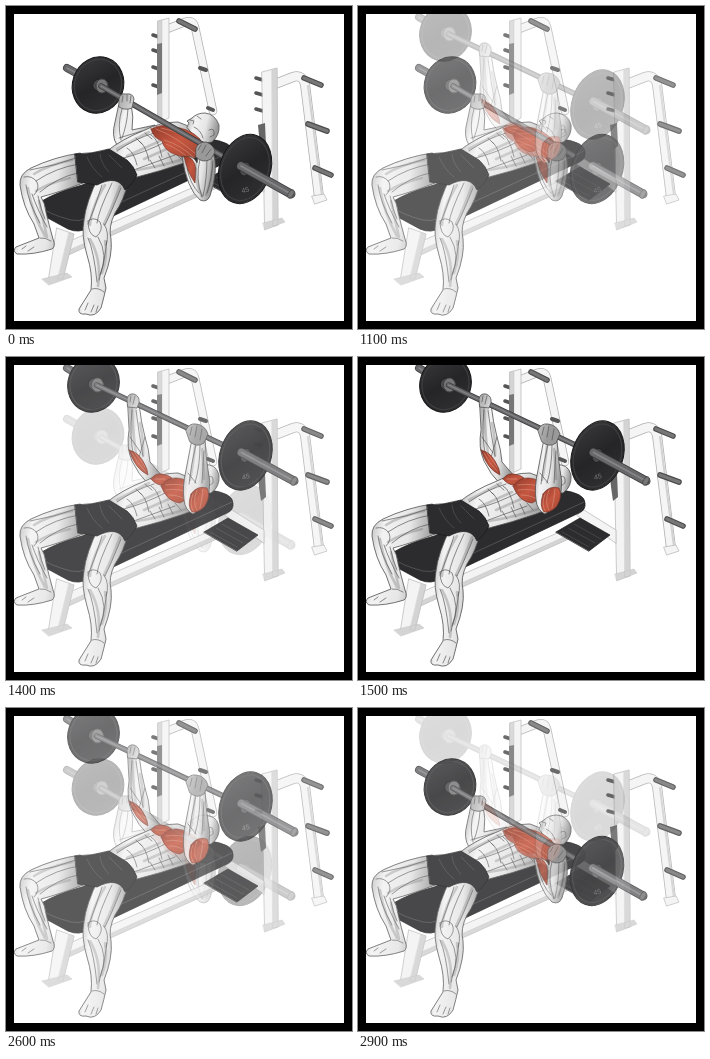
These frames come from a looping animation (346 px wide and 323 px high, 3000 ms). An HTML page:

```html
<!DOCTYPE html>
<html lang="en">
<meta charset="utf-8">
<title>Bench press</title>
<style>
html, body { margin: 0; width: 100%; height: 100%; overflow: hidden; background: #000 }
svg { display: block; width: 100%; height: 100% }
path, ellipse { stroke-linecap: round; stroke-linejoin: round }
.skin { fill: url(#skin); stroke: #505050; stroke-width: .8 }
.line { fill: none; stroke: #505050; stroke-width: .65 }
.shade { fill: none; stroke: #666; stroke-opacity: .32; stroke-width: 2.6 }
.red { fill: url(#red); stroke: #6f2f24; stroke-width: .6 }
.fiber { fill: none; stroke: #dc9480; stroke-width: .6 }
.steel { fill: #f4f4f4; stroke: #b4b4b4; stroke-width: .7 }
.edge { fill: #d4d4d4; stroke: #bbb; stroke-width: .4 }
.tube { fill: none }
.dark { fill: #2c2c2e; stroke: #19191a; stroke-width: .7 }
</style>
<svg viewBox="0 0 346 323" preserveAspectRatio="none">
<defs>
  <clipPath id="frame"><path d="M8 8H338V315H8Z"/></clipPath>
  <linearGradient id="skin" x2="1" y2=".25">
    <stop stop-color="#a6a6a6"/><stop offset=".3" stop-color="#f3f3f3"/>
    <stop offset=".65" stop-color="#e6e6e6"/><stop offset="1" stop-color="#999"/>
  </linearGradient>
  <linearGradient id="red" x2="1" y2="1">
    <stop stop-color="#8f3a2b"/><stop offset=".5" stop-color="#c65740"/><stop offset="1" stop-color="#a04634"/>
  </linearGradient>
  <linearGradient id="plate" x2="1" y2="1">
    <stop stop-color="#3c3c3e"/><stop offset=".5" stop-color="#252527"/><stop offset="1" stop-color="#333335"/>
  </linearGradient>

  <g id="rack">
    <g class="tube">
      <path id="leftLeg" d="M161 23L179 16Q187 13 189 21L207 105" stroke="#b0b0b0" stroke-width="8.5"/>
      <path d="M161 23L179 16Q187 13 189 21L207 105" stroke="#f5f5f5" stroke-width="7"/>
      <path d="M269 78L287 71Q296 68 299 78L313 191" stroke="#b0b0b0" stroke-width="10"/>
      <path d="M269 78L287 71Q296 68 299 78L313 191" stroke="#f5f5f5" stroke-width="8.4"/>
      <path d="M302 80L316 190" stroke="#d2d2d2" stroke-width="2"/>
      <path d="M147 29L153 31M147 44L153 46M147 61L153 63M147 79L153 81M250 72L257 74M250 87L257 89M250 103L257 105" stroke="#555" stroke-width="3.6"/>
      <path d="M194 62L200 64M202 102L207 104" stroke="#555" stroke-width="4"/>
      <path d="M173 15L189 23M298 72L315 79M302 118L321 125M309 162L325 169" stroke="#4b4b4d" stroke-width="5.6"/>
      <path d="M173 15L189 23M298 72L315 79M302 118L321 125M309 162L325 169" stroke="#777" stroke-width="3.4"/>
    </g>
    <path class="steel" d="M152 15L163 12V112L152 117ZM306 190L318 188L321 194L309 198Z"/>
    <path class="edge" d="M152 15L156 14V116L152 117Z"/>
    <path d="M151 38L156 37V87L151 89Z" fill="#777"/>
    <path class="steel" d="M256 66L271 62L272 219L259 223Z"/>
    <path class="edge" d="M266 64L271 62L272 219L267 220ZM257 217L276 212L279 216L259 224Z"/>
    <path d="M252 119L259 117L260 140L255 144L253 130Z" fill="#666"/>
  </g>

  <g id="bench">
    <path class="steel" d="M219 158L226 153L258 173V186ZM57 238L220 167L226 175L60 250Z"/>
    <path class="edge" d="M59 246L224 172L226 175L60 250Z"/>
    <path class="steel" d="M51 222L68 228L57 273L43 272Z"/>
    <path class="edge" d="M63 227L68 228L57 273L52 273ZM36 273L61 267L66 271L43 279Z"/>
    <path class="dark" d="M198 175L222 161L252 178L231 194Z"/>
    <path d="M204 175L231 190M210 171L237 186M216 167L243 182" stroke="#505050" stroke-width=".7"/>
    <path class="dark" d="M34 196Q50 186 76 179L203 133Q227 136 227 146Q228 153 221 156L84 221Q73 228 62 223L38 210Q30 204 34 196Z"/>
    <path d="M35 201Q42 208 65 214Q73 216 81 212L226 145" fill="none" stroke="#505052" stroke-width="1"/>
  </g>

  <g id="body">
    <path class="skin" d="M74 147Q48 151 25 162Q13 168 14 179Q17 201 28 218L33 232L10 241Q6 245 11 248Q27 249 46 243Q50 240 47 233Q43 219 40 206Q39 197 35 191Q54 186 77 177Z"/>
    <path class="shade" d="M66 154Q42 159 28 168M64 172Q43 177 30 185M22 182Q26 207 39 230M33 195Q37 214 41 231"/>
    <path class="line" d="M73 151Q49 160 24 164M73 158Q49 162 30 175M72 167Q52 171 34 186M18 171Q26 169 31 176Q34 183 28 189M20 179Q22 196 34 217M26 188Q31 203 41 221M32 190Q35 204 39 213M34 232Q39 231 45 235M16 243L20 240M22 245L28 241"/>

    <path class="skin" d="M101 145Q116 133 139 124Q154 116 172 116Q190 121 197 138Q196 151 178 157Q155 165 131 171Z"/>
    <path class="shade" d="M111 143L143 126M131 164Q158 160 183 151M121 150L154 135M138 153L163 142"/>
    <path class="line" d="M114 153Q139 147 163 134M111 145Q128 133 148 127M125 165Q147 157 169 149M121 142Q128 146 131 159M133 135Q140 139 143 155M145 129Q152 132 156 151M119 158L128 166M149 162L144 154M158 160L153 150M167 157L162 147M175 153L169 146M139 127L146 133M130 132L136 138"/>

    <path class="skin" d="M93 170Q80 196 78 214Q75 229 81 249Q87 268 85 284L73 303Q72 309 80 308Q89 312 95 302Q98 291 100 282L98 272Q107 249 105 233Q102 221 109 207Q118 194 122 176L112 167Z"/>
    <path class="shade" d="M99 179Q85 202 84 219M114 180Q105 204 98 218M84 233Q96 254 92 280M99 235Q102 251 96 267"/>
    <path class="line" d="M96 179Q88 204 82 218M106 177Q92 206 91 217M115 182Q105 207 99 219M82 215Q88 210 94 216Q98 224 90 231Q82 229 82 215M98 218Q104 227 100 239M82 232Q88 245 91 276M92 231Q103 249 94 269M101 235Q99 255 93 274M86 283Q92 281 98 286M79 304L82 297M85 306L88 299M90 306L92 300"/>

    <path class="dark" d="M69 148Q86 148 103 143L121 154Q128 160 131 169Q127 178 119 184Q112 168 91 179L72 176Z"/>
    <path d="M94 148Q95 158 103 166M103 149L116 162M81 151Q86 163 96 171" fill="none" stroke="#48484a" stroke-width="1"/>
  </g>
</defs>

<g clip-path="url(#frame)">
  <path d="M0 0H346V323H0Z" fill="#fff"/>
  <g id="lowered">
    <use href="#rack"/><use href="#bench"/>
    <path class="skin" d="M113 99L125 97Q128 111 126 124L149 119L151 126Q132 129 111 139Q105 130 109 116Z"/>
    <path class="line" d="M116 103Q111 119 115 134M122 103Q121 119 116 132M113 132L136 125"/>
    <use href="#body"/>
    <path class="skin" d="M181 121L183 117L181 115L186 112Q191 107 199 107Q209 108 213 119Q214 129 206 136Q195 139 189 131Z"/>
    <path class="line" d="M184 114L188 115L187 118M191 110L195 113M203 124Q209 121 208 129L204 131M188 121Q195 124 197 132"/>
    <path class="red" d="M145 123Q155 117 165 121Q182 121 194 133Q198 142 190 151Q179 153 168 148Q158 144 156 135Q147 132 145 123Z"/>
    <path class="fiber" d="M150 123Q168 129 191 149M155 122Q177 126 194 140M158 134Q175 139 187 151M160 138Q174 144 181 151"/>
    <path class="skin" d="M176 151Q187 148 191 157L193 146L207 146Q213 163 204 190Q201 197 194 194Q181 183 176 151Z"/>
    <path class="red" d="M178 150Q188 150 190 163L189 177Q181 166 178 150Z"/>
    <path class="shade" d="M190 158Q189 178 196 190M206 154Q207 173 200 189"/>
    <path class="line" d="M194 153Q189 172 196 191M201 151Q201 174 197 190M207 155Q206 172 201 187M181 162Q184 178 193 187"/>
    <g id="lowBar"></g>
    <path class="skin" d="M113 93Q114 87 120 88Q127 87 128 93L126 102Q119 105 113 101ZM190 142Q192 136 200 136Q208 139 209 146L205 153Q197 158 190 151Z"/>
    <path class="line" d="M117 90L116 96M121 89V95M125 90L124 97M195 139L192 144M200 139L196 147M205 143L200 150"/>
  </g>

  <g id="raised">
    <use href="#rack"/><use href="#bench"/>
    <path class="skin" d="M198 108Q210 106 213 118Q214 130 205 136Q196 137 192 128Z"/>
    <path class="line" d="M202 120Q208 117 207 126L203 129"/>
    <path class="skin" d="M122 47L133 47Q135 65 139 80Q143 92 144 105L157 120L143 128Q132 117 126 104Q120 91 123 73Z"/>
    <path class="shade" d="M126 52Q127 76 130 97M134 66Q138 86 137 99"/>
    <path class="line" d="M126 53Q123 79 128 101M130 53Q133 77 137 99M124 80L135 96M139 80L132 104"/>
    <path class="red" d="M123 93Q132 95 137 104Q142 112 142 118Q129 112 123 93Z"/>
    <path class="fiber" d="M126 96Q131 106 139 114M129 96Q134 102 139 110"/>
    <use href="#body"/>
    <path class="red" d="M145 122Q149 116 156 117Q163 118 166 121L156 128Q150 128 145 122Z"/>
    <path class="red" d="M155 129Q162 120 171 121Q182 122 187 129Q186 141 174 146Q161 145 155 129Z"/>
    <path class="fiber" d="M160 128Q173 126 184 130M160 133Q174 131 183 136M163 138Q172 138 179 142M149 122L159 122"/>
    <g id="highBar"></g>
    <path class="skin" d="M186 84L199 83Q200 100 202 113Q205 124 203 135Q200 149 187 157Q179 153 178 143Q176 130 180 113Z"/>
    <path class="red" d="M185 137Q191 128 201 131Q205 139 199 149Q193 156 186 155Q181 149 185 137Z"/>
    <path class="fiber" d="M187 137Q183 147 187 154M191 133Q186 145 191 153M197 132Q196 143 194 151"/>
    <path class="shade" d="M189 89Q187 110 184 123M196 92Q198 112 198 122"/>
    <path class="line" d="M190 87Q185 108 183 127M194 88Q194 109 189 126M198 94L196 126M182 116L190 126"/>
    <path class="skin" d="M121 42Q122 36 128 37Q134 39 133 46L131 51L122 50ZM180 73Q183 66 190 67Q199 68 202 77L198 86Q191 91 184 85Z"/>
    <path class="line" d="M125 39L124 45M129 39L127 47M186 70L184 78M191 69L189 80M196 72L194 83"/>
  </g>
</g>
</svg>
<script>
const byId = id => document.getElementById(id);
const stroke = (from, to, width, color) =>
  `<path d="M${from}L${to}" stroke="${color}" stroke-width="${width}" stroke-linecap="butt"/>`;
const rod = (from, to, width) =>
  stroke(from, to, width, '#3a3a3a') + stroke(from, to, width - 1.4, '#68686b') + stroke(from, to, width * .2, '#858587');

function disc([x, y], rx, ry) {
  const ring = (scale, fill, color) =>
    `<ellipse rx="${rx * scale}" ry="${ry * scale}" fill="${fill}" stroke="${color}"/>`;
  return `<g transform="translate(${x} ${y}) rotate(19)">${ring(1, 'url(#plate)', '#171718')}
    ${ring(.91, 'none', '#404042')}${ring(.2, '#4a4a4c', '#222')}</g>`;
}

function barbell(start, far, near, end) {
  const [x, y] = near;
  return rod(start, far, 8) + disc(far, 25.5, 28.5)
    + `<ellipse cx="${far[0] + 4}" cy="${far[1] + 1}" rx="6" ry="7" fill="#777" stroke="#444"/>`
    + rod([far[0] + 3, far[1] + 1], near, 5.5) + disc(near, 25.5, 35.5)
    + `<text x="${x - 8}" y="${y + 23}" transform="rotate(-12 ${x} ${y})" font-family="Liberation Sans, sans-serif" font-size="7" fill="#777">45</text>`
    + rod([x - 4, y - 3], end, 9)
    + `<ellipse cx="${end[0]}" cy="${end[1]}" rx="2.6" ry="4.6" transform="rotate(28 ${end})" fill="#777" stroke="#444" stroke-width=".7"/>`;
}

byId('lowBar').innerHTML = barbell([61, 62], [92, 79], [239, 163], [285, 188]);
byId('highBar').innerHTML = barbell([61, 11], [87.5, 27], [239.5, 98.5], [288, 124]);

// Both holds last a second; the dissolves advance every 100 ms.
function raisedOpacity(ms) {
  const tick = Math.floor(ms / 100);
  if (tick < 10) return 0;
  return tick < 25 ? Math.min(1, (tick - 9) / 6) : (30 - tick) / 6;
}

// The two poses fade separately over white, so shared parts pale mid-dissolve.
function draw() {
  const raised = raisedOpacity(performance.now() % 3000);
  byId('raised').setAttribute('opacity', raised);
  byId('lowered').setAttribute('opacity', 1 - raised);
  requestAnimationFrame(draw);
}
draw();
</script>
</html>
```
